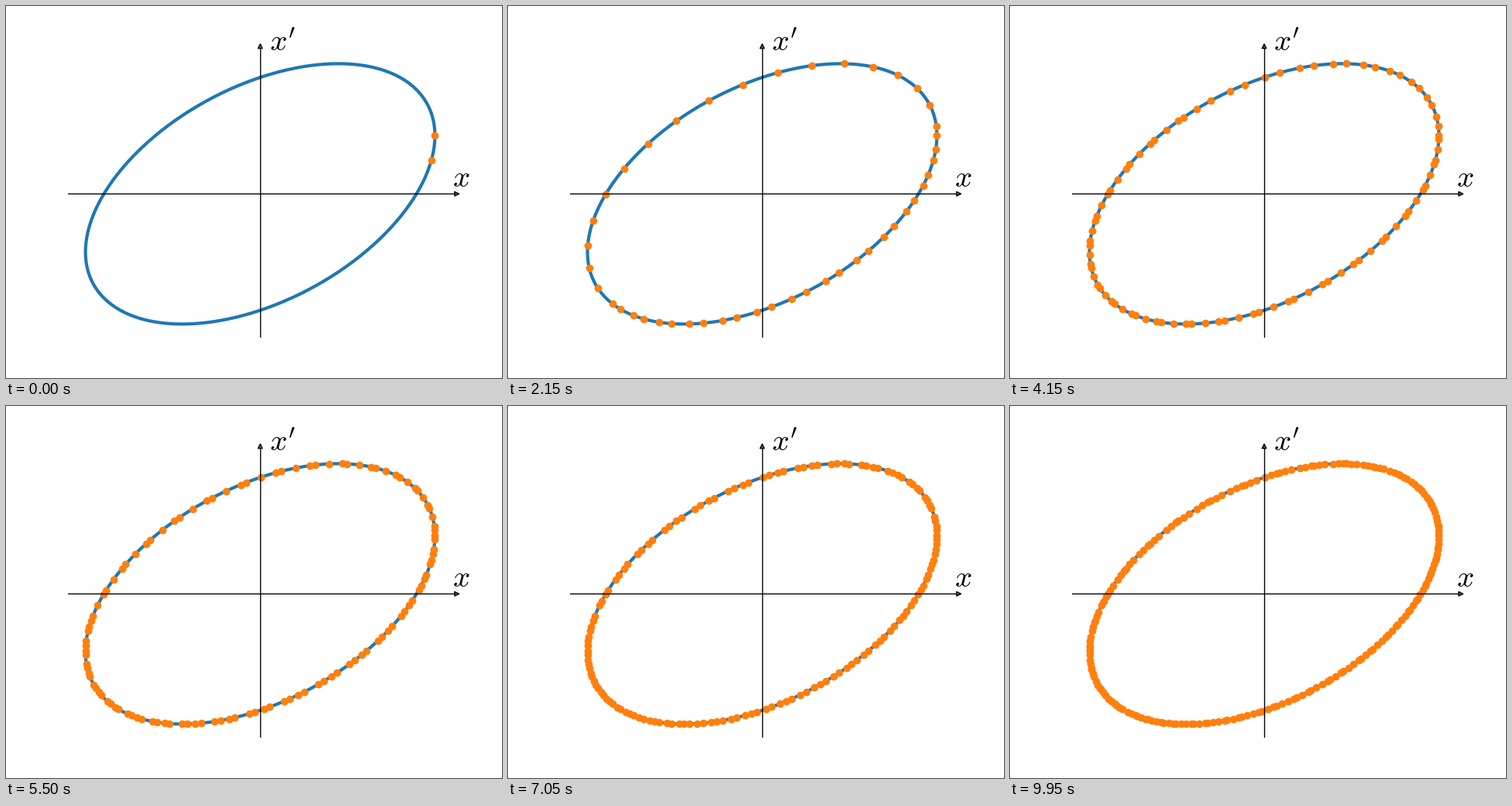
Recreate the animation shown at these times as a matplotlib script. Size 640x480 px, loop 10 s.

```python
import numpy as np
import matplotlib.pyplot as plt
from matplotlib.animation import FuncAnimation
from matplotlib.patches import FancyArrowPatch
from matplotlib.path import Path

plt.rcParams["mathtext.fontset"] = "cm"

W, H = 640, 480
CX, CY = 328, 237.6            # origin of the phase space, in pixels
HALF_W, HALF_H = 248, 184.8    # half lengths of the axes
ALPHA = -0.5                   # tilt parameter of the ellipse
PHASE_STEP = 0.2               # phase advance per turn, in radians
FRAMES, INTERVAL = 200, 50


def ellipse(phase):
    """Pixel position on the phase-space ellipse."""
    x = np.cos(phase)
    slope = -(ALPHA * np.cos(phase) + np.sin(phase)) / np.sqrt(1 + ALPHA**2)
    return CX + HALF_W / 1.1 * x, CY + HALF_H / 1.1 * slope


fig = plt.figure(figsize=(W / 100, H / 100), dpi=100, facecolor="white")
ax = fig.add_axes([0, 0, 1, 1])
ax.set_xlim(0, W)
ax.set_ylim(0, H)
ax.axis("off")


def add_axis(start, end):
    ax.add_patch(FancyArrowPatch(path=Path([start, end]), arrowstyle="-|>",
                                 mutation_scale=10, facecolor="C0",
                                 edgecolor="black", linewidth=1, zorder=2.5))


# Each arrow reaches 10 px past the end of its axis.
add_axis((CX - HALF_W, CY), (CX + HALF_W + 10, CY))
add_axis((CX, CY - HALF_H), (CX, CY + HALF_H + 10))

ax.text(CX + HALF_W, CY + 0.05 * HALF_H, "$x$", fontsize=28)
ax.text(CX + 0.05 * HALF_W, CY + HALF_H, "$x'$", fontsize=28)

ax.plot(*ellipse(np.linspace(0, 2 * np.pi, 400)), color="C0", linewidth=3)
dots, = ax.plot([], [], "o", color="C1", markersize=6)


def update(frame):
    turns = np.arange(frame + 2)
    dots.set_data(*ellipse(PHASE_STEP * turns))
    return dots,


anim = FuncAnimation(fig, update, frames=FRAMES, interval=INTERVAL,
                     repeat=True, repeat_delay=0)
plt.show()
```
